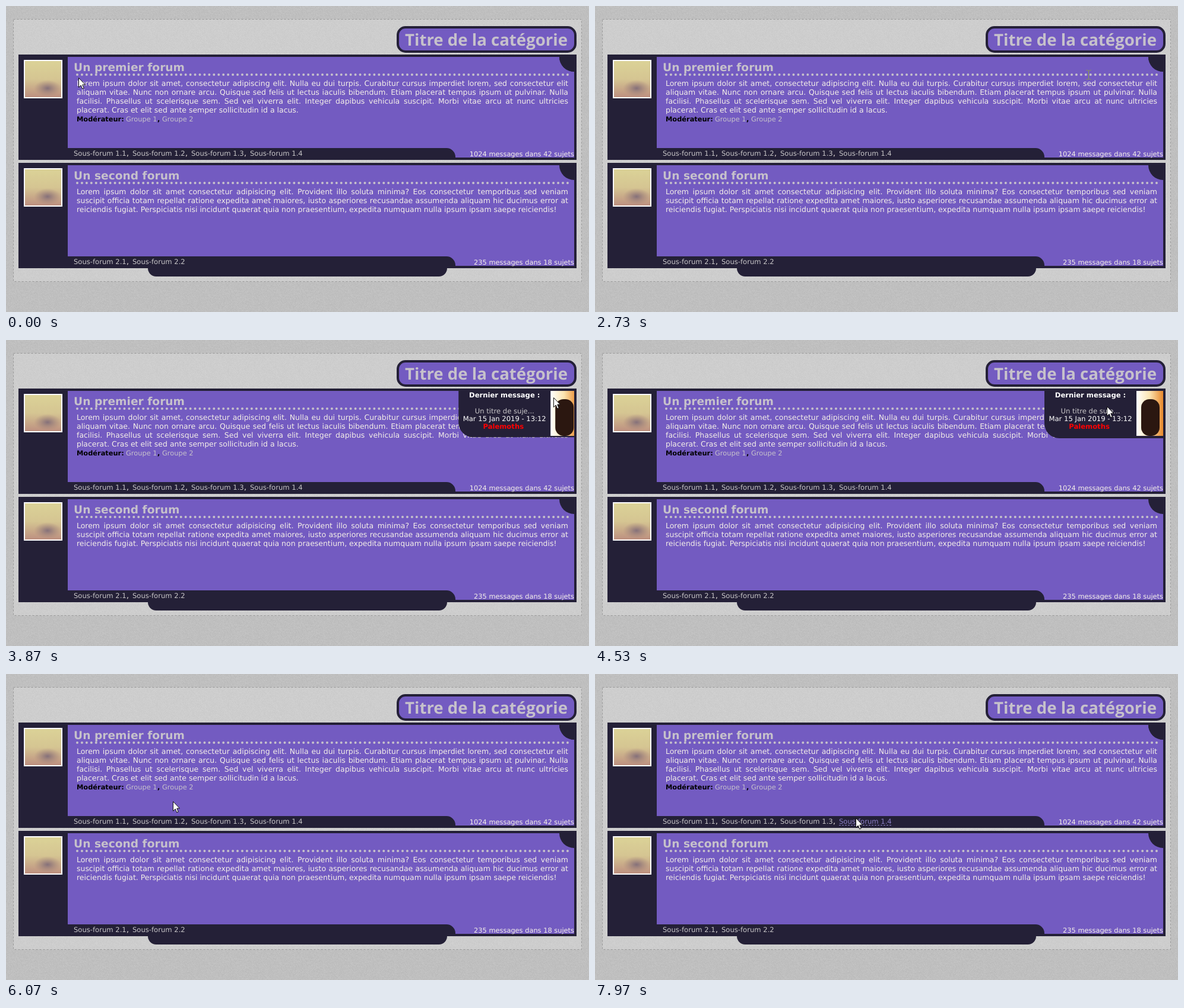
An HTML page with a canvas for the animation above (8000 ms loop, 982 by 517 pixels).

```html
<!DOCTYPE html>
<html lang="fr">
<head>
<meta charset="utf-8">
<title>Forum</title>
<style>
  html, body { margin: 0; width: 100%; height: 100%; overflow: hidden; background: #bebebe; }
  canvas, svg { position: absolute; left: 0; top: 0; }
  text { font-family: "DejaVu Sans", sans-serif; text-rendering: geometricPrecision; white-space: pre; }
  .dark { fill: #242037; }
  .purple { fill: #735bc1; }
  .category { font: bold 27.6px "Open Sans", sans-serif; fill: #c6c1cb; }
  .title { font-size: 18.65px; font-weight: bold; fill: #c6c1cb; }
  .body { font-size: 12.46px; fill: #f5f0e8; }
  .small { font-size: 11.4px; fill: #f5f0e8; }
  .last { font-size: 11.6px; fill: #fff; text-anchor: middle; }
  .bold { font-weight: bold; }
  .link text { font-size: 11.6px; fill: #c8c6c8; }
  .link path { stroke: #8b7fc4; stroke-dasharray: 3 2; visibility: hidden; }
  .link.hover path { visibility: visible; }
  .link.hover text, .title.hover { fill: #8b7fc4; }
  .dots { stroke: #c6c1cb; stroke-width: 4; stroke-linecap: round; stroke-dasharray: 0 7.942; }
  #ibeam { mix-blend-mode: difference; stroke: #fff; fill: none; }
  #arrow, #hand { fill: #fff; stroke: #111; stroke-linejoin: round; }
</style>
</head>
<body>
<canvas width="982" height="517"></canvas>
<svg width="982" height="517" viewBox="0 0 982 517">
  <defs>
    <linearGradient id="sand" x2="0" y2="1">
      <stop stop-color="#dbd297"/><stop offset=".5" stop-color="#d5c592"/><stop offset="1" stop-color="#bd9080"/>
    </linearGradient>
    <radialGradient id="smudge">
      <stop stop-color="#84707a"/><stop offset="1" stop-color="#a08078" stop-opacity="0"/>
    </radialGradient>
    <linearGradient id="glow">
      <stop stop-color="#fff"/><stop offset=".5" stop-color="#fbe3b0"/><stop offset="1" stop-color="#e8882c"/>
    </linearGradient>
    <clipPath id="panelClip"><path id="clipShape"/></clipPath>
  </defs>
  <rect x="12.5" y="22.5" width="957" height="443" fill="#fff" fill-opacity=".22" stroke="#999" stroke-dasharray="3"/>
  <rect class="purple" x="660" y="36" width="299" height="41" rx="13" stroke="#242037" stroke-width="4"/>
  <text class="category" x="672" y="67">Titre de la catégorie</text>
  <g id="forums"></g>
  <path class="dark" d="M239 443H743a14 14 0 0 1-14 14H253a14 14 0 0 1-14-14Z"/>
  <path id="panel" class="dark"/>
  <g clip-path="url(#panelClip)">
    <g id="content">
      <text class="last bold" x="77.5" y="97">Dernier message :</text>
      <text class="last" x="77.5" y="124" style="fill:#c8c6c8">Un titre de suje...</text>
      <text class="last" x="77.5" y="137">Mar 15 Jan 2019 - 13:12</text>
      <text class="last bold" x="75.5" y="150" style="fill:#f00">Palemoths</text>
      <rect x="155" y="86" width="45" height="76" fill="url(#glow)"/>
      <rect x="163" y="100" width="31" height="62" rx="14" fill="#2b1710"/>
    </g>
  </g>
  <g id="cursor">
    <path id="arrow" d="M.5.5V16.5L4.2 13 6.7 19 9.2 18 6.8 12H11.5Z"/>
    <path id="hand" d="M-1.5 14V1.5a1.5 1.5 0 0 1 3 0V8q1.5-1.5 3 .3 1.5-1 3 .6 3-.6 3 2.6V16q0 3-2 6.5H0q-1-3-5.5-9-.8-2.5 1.5-2.2Z"/>
    <path id="ibeam" d="M-3.5-7.5H-1.5L.5-6.5 2.5-7.5H4.5M.5-6.5V7M-3.5 8H-1.5L.5 7 2.5 8H4.5"/>
  </g>
</svg>
<script>
const $ = id => document.getElementById(id);

function paintPaper() {
  const ctx = document.querySelector('canvas').getContext('2d');
  const size = 120, tile = new OffscreenCanvas(size, size), tc = tile.getContext('2d');
  let seed = 7;
  const random = () => (seed = seed * 16807 % 2147483647) / 2147483647;
  for (let y = 0; y < size; y++) {
    for (let x = 0; x < size; x++) {
      const v = 185 + random() * 11 + (x + y) % 2 * 2 | 0;
      tc.fillStyle = `rgb(${v},${v},${v})`;
      tc.fillRect(x, y, 1, 1);
    }
  }
  ctx.fillStyle = ctx.createPattern(tile, 'repeat');
  ctx.fillRect(0, 0, 982, 517);
}

const text = (cls, x, y, str, more = '') => `<text class="${cls}" x="${x}" y="${y}" ${more}>${str}</text>`;

function forum(top, title, lines, subs, count, extra = '') {
  const links = subs.map((name, i) => {
    const x = 114 + 99 * i;
    const comma = i < subs.length - 1 ? text('body', x + 89, 253, ',') : '';
    return `<g class="link">${text('', x, 253, name)}<path d="M${x} 255.5h89"/></g>${comma}`;
  });
  const body = lines.map((line, i) =>
    text(i < lines.length - 1 ? 'body justify' : 'body', 119, 135 + 15 * i, line));
  return `<g transform="translate(0 ${top - 82})">
    <rect class="dark" x="21" y="82" width="940" height="178"/>
    <rect class="purple" x="104" y="86" width="853" height="170"/>
    <path class="dark" d="M932 86h25v25a25 25 0 0 1-25-25ZM104 240H742a15 15 0 0 1 15 15v1H104Z"/>
    <rect x="30" y="91" width="65" height="65" fill="#fff"/>
    <rect x="32" y="93" width="61" height="61" fill="url(#sand)"/>
    <ellipse cx="70" cy="139" rx="23" ry="14" fill="url(#smudge)"/>
    ${text('title', 114, 110, title)}
    <path class="dots" d="M120 116H946.1"/>
    ${body.join('')}${extra}${links.join('')}
    ${text('small', 957, 254, count, 'text-anchor="end"')}
  </g>`;
}

$('forums').innerHTML = forum(82, 'Un premier forum', [
  'Lorem ipsum dolor sit amet, consectetur adipiscing elit. Nulla eu dui turpis. Curabitur cursus imperdiet lorem, sed consectetur elit',
  'aliquam vitae. Nunc non ornare arcu. Quisque sed felis ut lectus iaculis bibendum. Etiam placerat tempus ipsum ut pulvinar. Nulla',
  'facilisi. Phasellus ut scelerisque sem. Sed vel viverra elit. Integer dapibus vehicula suscipit. Morbi vitae arcu at nunc ultricies',
  'placerat. Cras et elit sed ante semper sollicitudin id a lacus.'
], ['Sous-forum 1.1', 'Sous-forum 1.2', 'Sous-forum 1.3', 'Sous-forum 1.4'], '1024 messages dans 42 sujets',
  text('small bold', 119, 195, 'Modérateur:', 'style="fill:#000"') +
  text('small', 202, 195, 'Groupe 1', 'style="fill:#c6c1cb"') +
  text('small bold', 255, 195, ',', 'style="fill:#000"') +
  text('small', 263, 195, 'Groupe 2', 'style="fill:#c6c1cb"')
) + forum(265, 'Un second forum', [
  'Lorem ipsum dolor sit amet consectetur adipisicing elit. Provident illo soluta minima? Eos consectetur temporibus sed veniam',
  'suscipit officia totam repellat ratione expedita amet maiores, iusto asperiores recusandae assumenda aliquam hic ducimus error at',
  'reiciendis fugiat. Perspiciatis nisi incidunt quaerat quia non praesentium, expedita numquam nulla ipsum ipsam saepe reiciendis!'
], ['Sous-forum 2.1', 'Sous-forum 2.2'], '235 messages dans 18 sujets');

for (const line of document.querySelectorAll('.justify')) {
  const gaps = line.textContent.split(' ').length - 1;
  line.style.wordSpacing = (828 - line.getComputedTextLength()) / gaps + 'px';
}

// Pointer track: time, x, y
const track = [
  [0, 122, 121], [200, 122, 121], [670, 128, 105], [900, 128, 105], [930, 129, 107], [1170, 129, 107],
  [1300, 152, 119], [1770, 380, 136], [1970, 482, 137], [2800, 863, 114], [3286, 938, 94], [3500, 945, 91],
  [3640, 944, 92], [4470, 864, 111], [4530, 862, 112], [4900, 835, 129], [5210, 757, 141], [5430, 626, 141],
  [6130, 249, 222], [6570, 158, 244], [6770, 158, 244], [6870, 174, 250], [7570, 378, 250],
  [7800, 425, 239], [7970, 439, 243], [8000, 439, 243]
];
// Pointer shapes and the time each one ends
const shapes = [[450, 'arrow'], [1200, 'hand'], [3690, 'ibeam'], [5210, 'arrow'], [5850, 'ibeam'],
  [6400, 'arrow'], [7900, 'hand'], [8000, 'arrow']];
const OPEN = 3286, CLOSE = 5210, DURATION = 750;

// cubic-bezier(.25, .1, .25, 1)
function ease(u) {
  if (u <= 0 || u >= 1) return u <= 0 ? 0 : 1;
  let lo = 0, hi = 1;
  for (let i = 0; i < 20; i++) {
    const s = (lo + hi) / 2;
    if (.75 * s * (1 - s) + s ** 3 < u) lo = s; else hi = s;
  }
  return .3 * lo * (1 - lo) ** 2 + 3 * lo * lo * (1 - lo) + lo ** 3;
}

function pointerAt(t) {
  const i = track.findIndex(k => k[0] > t), [t0, x0, y0] = track[i - 1], [t1, x1, y1] = track[i];
  const u = (t - t0) / (t1 - t0);
  return [Math.round(x0 + (x1 - x0) * u), Math.round(y0 + (y1 - y0) * u)];
}

const title = document.querySelector('.title');
const links = [...document.querySelectorAll('.link')].slice(0, 4);

function render(t) {
  const [x, y] = pointerAt(t);
  const shape = shapes.find(s => t < s[0])[1];
  $('cursor').setAttribute('transform', `translate(${x} ${y})`);
  for (const id of ['arrow', 'hand', 'ibeam']) $(id).style.display = id === shape ? '' : 'none';

  title.classList.toggle('hover', t >= 450 && t < 1240);
  links.forEach((link, i) => {
    const left = 114 + 99 * i;
    link.classList.toggle('hover', t >= 6400 && x >= left && x <= left + 89);
  });

  const open = ease((t - OPEN) / DURATION) - ease((t - CLOSE) / DURATION);
  const left = 932 - 175 * open, bottom = 111 + 55 * open;
  const d = `M${left} 86H957V${bottom}H${left + 25}a25 25 0 0 1-25-25Z`;
  $('panel').setAttribute('d', d);
  $('clipShape').setAttribute('d', d);
  $('content').setAttribute('transform', `translate(${left} 0)`);
  $('content').style.display = t >= OPEN && t < CLOSE ? '' : 'none';
}

paintPaper();
function tick() {
  render(performance.now() % 8000);
  requestAnimationFrame(tick);
}
tick();
</script>
</body>
</html>
```
